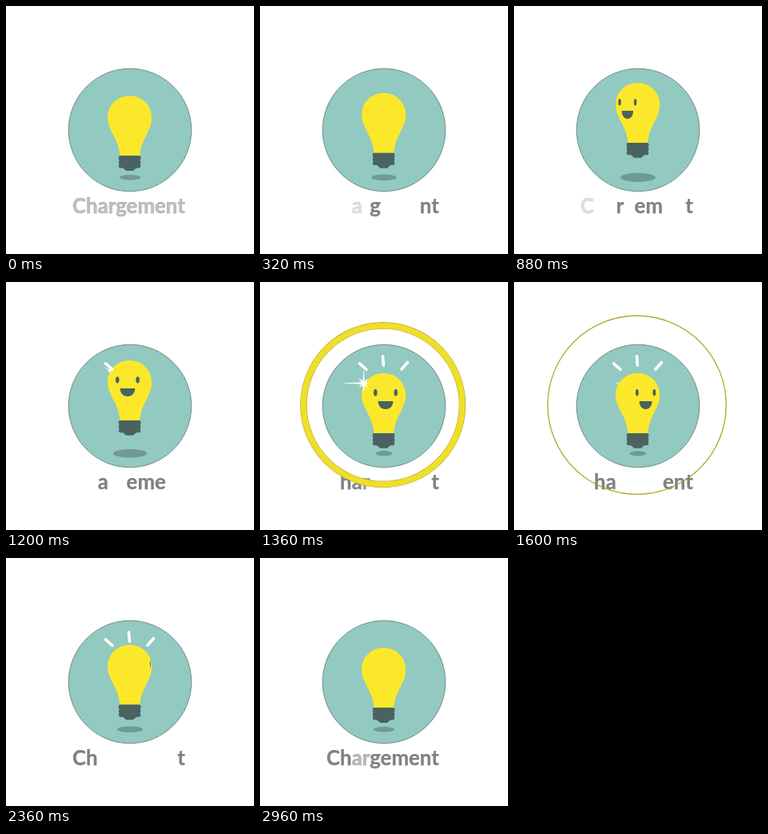
An HTML page for the animation above (3000 ms loop, 310 by 310 pixels).

```html
<!DOCTYPE html>
<html lang="fr">
<head>
<meta charset="utf-8">
<title>Chargement</title>
<style>
  html, body { margin: 0; width: 100%; height: 100%; overflow: hidden; background: #fff; }
  svg { display: block; width: 100%; height: 100%; }
  text { font: 700 25.8px Lato, "Open Sans", sans-serif; fill: #808284; stroke: #6c6e70; stroke-width: .25; }
  .dark { fill: #4a6361; }
  .rays { stroke: #fff; stroke-width: 3.6; stroke-linecap: round; }
</style>
</head>
<body>
<svg viewBox="0 0 310 310">
  <defs>
    <path id="glass" d="M0 0C15.5 0 27.6 12 27.6 27C27.6 44.5 14 54 12.8 75H-12.3C-13 54 -27.6 44 -27.6 27C-27.6 12 -15.5 0 0 0Z"/>
    <clipPath id="inside"><use href="#glass"/></clipPath>
  </defs>
  <text id="word" x="83" y="259"></text>
  <g id="ring" fill="none">
    <circle id="rim" cx="153.7" cy="153.7" stroke="#8f8418"/>
    <circle id="band" cx="153.7" cy="153.7" stroke="#f0df28"/>
  </g>
  <circle cx="155" cy="155" r="76.8" fill="#92c9c0" stroke="#3c5652" stroke-width=".6"/>
  <ellipse id="shadow" cx="155" cy="214.3" fill="#6f9a93"/>
  <g id="bulb">
    <use href="#glass" fill="#fce82b"/>
    <g class="dark">
      <rect x="-13" y="75" width="26" height="14"/>
      <rect x="-13.8" y="75" width="27.6" height="5.8" rx="2"/>
      <rect x="-13.8" y="80.6" width="27.6" height="5" rx="2.4"/>
      <rect x="-13.8" y="85.4" width="27.6" height="4.8" rx="2.4"/>
      <path d="M-9 89.5H9L4.5 93.8H-4.5Z"/>
    </g>
    <g clip-path="url(#inside)">
      <g id="face" class="dark">
        <ellipse cx="-13" cy="24.3" rx="2.3" ry="4.2"/>
        <ellipse cx="13" cy="24.3" rx="2.3" ry="4.2"/>
        <path d="M-9.6 35H9.6C9.6 41 5.5 45 0 45S-9.6 41 -9.6 35Z"/>
      </g>
    </g>
    <path id="star" fill="#fff"/>
  </g>
  <g id="rays" class="rays"></g>
</svg>
<script>
const LOOP = 3000, STEP = 40, CENTER = 154.6;
const $ = id => document.getElementById(id);
const clamp = v => Math.max(0, Math.min(1, v));
const span = (t, a, b) => clamp((t - a) / (b - a));
const mix = (a, b, p) => a + (b - a) * p;
const sine = p => (1 - Math.cos(Math.PI * p)) / 2;
const set = (el, attrs) => { for (const k in attrs) el.setAttribute(k, attrs[k]); };
const svg = (tag, parent) => parent.appendChild(
  document.createElementNS('http://www.w3.org/2000/svg', tag));

function along(keys, t) {
  let i = 1;
  while (i < keys.length - 1 && t > keys[i][0]) i++;
  const [a, b] = [keys[i - 1], keys[i]];
  return mix(a[1], b[1], span(t, a[0], b[0]));
}

// Each letter: start and end of the times it shows, then its last start
const letters = [
  ['C', 420, 900, 2050, 2480, 2830],
  ['h', 1260, 1800, 2200, 2560, 2760],
  ['a', 300, 760, 1000, 1760, 2915],
  ['r', 800, 1080, 1300, 1480, 2915],
  ['g', 160, 420, 900, 1120, 1880, 2200, 2700],
  ['e', 480, 1280, 1900, 2280, 2780],
  ['m', 560, 1290, 2600],
  ['e', 1040, 1290, 1500, 1960, 2820],
  ['n', 200, 480, 1520, 2100, 2740],
  ['t', 120, 440, 700, 1000, 1270, 1780, 2240, 2520, 2840]
].map(([char, ...times]) => {
  const el = svg('tspan', $('word'));
  el.textContent = char;
  return { el, times: [...times, LOOP + STEP] };
});

// Inner end, outer end
const rays = [[133, 109.3, 124.5, 101.8], [154.4, 104.2, 153.5, 92.8], [177, 109, 184.5, 100.5]]
  .map(ends => ({ ends, el: svg('line', $('rays')) }));

const faceX = [[0, 114], [600, 133], [1360, 157], [1600, 164.6], [2360, 183], [3000, 199]];
const starSize = [[1140, 0], [1200, .42], [1360, 1], [1480, .5], [1600, .18], [1680, 0]];
const arms = [7, 8, 11, 9, 28, 10, 18, 8];
$('star').setAttribute('d', 'M' + arms.map((r, i) => {
  const a = i * Math.PI / 4, b = a + Math.PI / 8;
  return [r * Math.cos(a), r * Math.sin(a), 3 * Math.cos(b), 3 * Math.sin(b)]
    .map(v => v.toFixed(2)).join(' ');
}).join('L') + 'Z');

function bulbTop(t) {
  if (t < 1120) return mix(112.3, 94, sine(t / 1120));
  if (t < 1640) return mix(94, 114, span(t, 1120, 1280) ** 2.3);
  if (t < 2240) return mix(114, 108.3, sine(span(t, 1640, 2240)));
  return mix(108.3, 112.3, sine(span(t, 2240, LOOP)));
}

function drawWord(t) {
  const now = t < STEP ? t + LOOP : t;
  for (const { el, times } of letters) {
    let level = 0;
    for (let i = 0; i < times.length; i += 2)
      level = Math.max(level, clamp(Math.min(now - times[i], times[i + 1] - now) / 80));
    set(el, { 'fill-opacity': level, 'stroke-opacity': clamp(level * 2) });
  }
}

function drawBulb(t) {
  const top = bulbTop(t), lift = 114 - top;
  set($('bulb'), { transform: `translate(${CENTER} ${top})` });
  set($('shadow'), { rx: 10.5 + 2 * lift ** .6, ry: 3 + .15 * lift });

  const off = along(faceX, t) - CENTER;
  const squeeze = Math.max(.2, 1 - .0055 * Math.abs(off) ** 1.5);
  set($('face'), { transform: `translate(${off} 0) scale(${squeeze} 1)` });

  const turn = 40 * (1 - span(t, 1140, 1360));
  set($('star'), { transform: `translate(-25 12.5) rotate(${turn}) scale(${along(starSize, t)})` });
}

function drawRing(t) {
  const p = span(t, 1220, 1640), r = 70 + 41.6 * (1 - (1 - p) ** 3), w = 13 * (1 - p) ** 1.25;
  set($('ring'), { visibility: p > 0 && p < 1 ? 'visible' : 'hidden' });
  set($('rim'), { r, 'stroke-width': w + .4 });
  set($('band'), { r, 'stroke-width': Math.max(0, w - .3) });
}

function drawRays(t) {
  const leave = span(t, 2760, 2940);
  rays.forEach(({ ends: [x1, y1, x2, y2], el }, i) => {
    const first = 1140 + 60 * i, grow = span(t, first, first + 60);
    const from = 2 * leave, to = grow + leave;
    set(el, {
      visibility: grow > 0 && leave < 1 ? 'visible' : 'hidden',
      x1: mix(x1, x2, from), y1: mix(y1, y2, from),
      x2: mix(x1, x2, to), y2: mix(y1, y2, to)
    });
  });
}

const start = performance.now();
function frame() {
  const t = Math.floor((performance.now() - start) % LOOP / STEP) * STEP;
  drawWord(t);
  drawBulb(t);
  drawRing(t);
  drawRays(t);
  requestAnimationFrame(frame);
}
frame();
</script>
</body>
</html>
```
